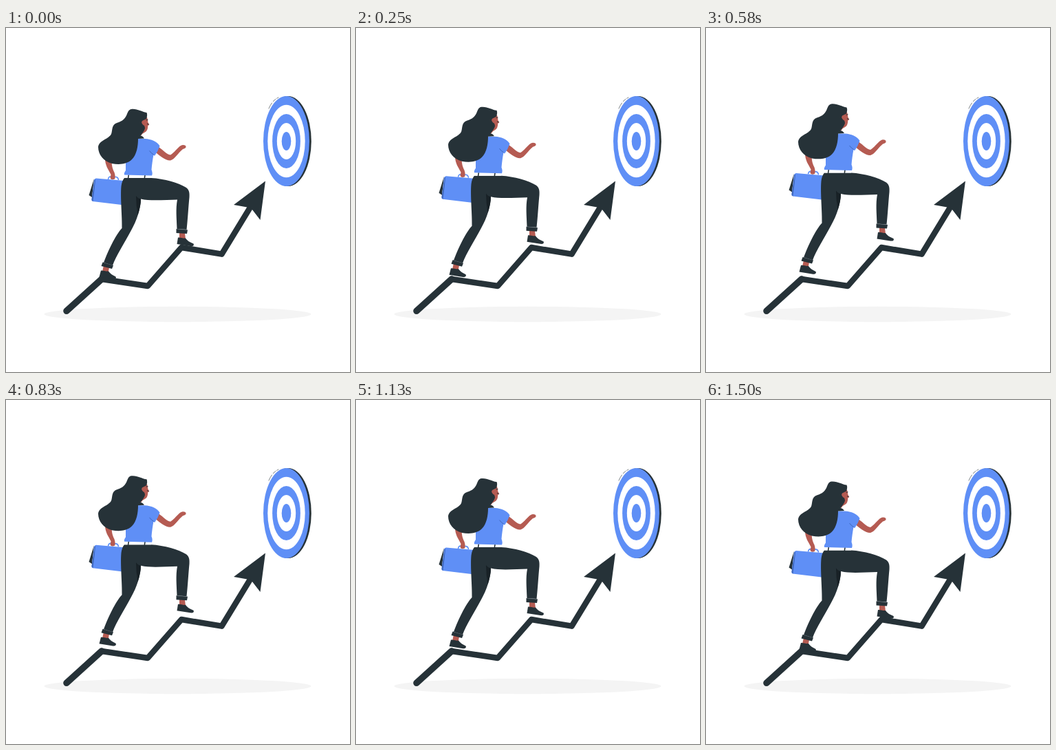
An HTML page for the animation above (1540 ms loop, 500 by 500 pixels).

```html
<!DOCTYPE html>
<html lang="en">
<head>
<meta charset="utf-8">
<title>Climbing to the target</title>
<style>
  html, body { margin: 0; height: 100%; overflow: hidden; background: #fff; }
  svg { display: block; width: 100%; height: 100%; }
  .ink { fill: #263238; }
  .blue { fill: #5f8ff6; }
  .skin { fill: #b55b52; }
  .white { fill: #fff; }
  .line { fill: none; stroke: #263238; stroke-linecap: round; stroke-linejoin: round; }
</style>
</head>
<body>
<svg viewBox="0 0 500 500">
  <ellipse cx="249.5" cy="416" rx="194" ry="11.2" fill="#f4f4f4"/>

  <g id="target">
    <path class="line" stroke-width=".6" stroke-dasharray="9 3 5 2" d="M382 117Q387 105 396 101"/>
    <ellipse class="ink" cx="410" cy="164.5" rx="33.8" ry="65.5"/>
  </g>

  <g id="chart">
    <path class="line" stroke-width="9.6" d="M88 411.3L139 365"/>
    <path class="line" stroke-width="8.4" d="M139 365L206 375L255 319L313.5 328.7L356 259"/>
    <path class="ink" d="M377 222.5L331 257L356 261.500L369.500 279Z"/>
  </g>

  <g id="woman">
    <g id="bag">
      <path class="ink" d="M128 219L120.500 243L125 246Z"/>
      <path class="blue" d="M131 218.500L172 222V257.500L126 252Q124 251 124.500 249L128 221Q129 218.500 131 218.500Z"/>
      <path fill="#3f68bd" d="M129 219.500L124.500 249Q124 251 126.500 252L130 221Z"/>
      <path fill="none" stroke="#5f8ff6" stroke-width="1.700" d="M148.500 220Q149 216 152 216L160 216.500Q163 217 163.500 221"/>
    </g>
    <path class="skin" d="M144 190C144 200 149 206 152.500 213L151.500 218Q153 221.500 158 219.500Q159.500 216 157.500 210C154.500 204 153 198 154 190Z"/>

    <g id="legs">
      <path class="skin" d="M252 297L260 298L261 307H252ZM142 345L150 348L148.500 356L140 354Z"/>
      <path class="ink" d="M250 304.500C253 304 257 306 261 305.500C264 310 268 311.500 272.500 313.500C274 316.500 271 317.500 268 317L248.500 314Z"/>
      <path class="ink" d="M138 352.500C141 352 145 354 149 353.500C152 358 156 359.500 159.500 361.500C161 364.500 158 365.700 154 365L135.500 362Z"/>
      <path class="ink" d="M172 218H211C230 219 251 225 262 232C266 235 267 239 266.500 246C265 262 264 280 262.500 293L248.500 292C248 276 246.500 263 249 249.500C233 249.500 211 252 196 248.500C196 262 190 280 182 294C173 311 160 331 155 345L142 341C148 325 159 301 168.500 291C169 275 166 246 167.500 230Q168.500 222 172 218Z"/>
      <path fill="#182126" d="M189 244Q192 248 196 248.500Q196 258 191.500 272Q189 257 189 244Z"/>
      <path class="ink" d="M247.500 292L264 293.500L263 299L247.500 298ZM140.500 340.500L156 345L154 350L138.500 346Z"/>
      <path class="line" stroke-width=".5" style="stroke:#56636a" d="M248.500 292.300L263 293.500M141.500 340.900L155 344.900"/>
    </g>

    <g id="torso">
      <path class="white" d="M174 213.500L212 214L211 218H172Z"/>
      <path class="line" stroke-width="1.600" d="M178.200 214L177.600 218M202 214L201.400 218"/>
      <path class="skin" d="M222 173C229 178 234 184 239 184.500C245 181 249 174 254 171C257 169 261 170 261.500 172C262 175.500 258 175 256 177C250 182 245 191 239 192.500C232 193 222 185 217 180Z"/>
      <path class="blue" d="M190 161H202C211 161.500 220 165 223.500 171.500Q221 179 216 186L214.500 184C213 192 212 199 211.500 206Q213.500 211 212 214.500L172 213.500Q171 211 174 207V185Z"/>
      <path fill="none" stroke="#3f68bd" stroke-width="1" d="M208.500 178.500Q211 182 215 184.500"/>
    </g>

    <g id="head">
      <path class="skin" d="M196 131L205 130Q206.500 134 206.300 137L208.200 140.500L206.300 142Q206 150 202 151.500Q198 153 196 157Z"/>
      <path class="ink" d="M182 118C191 117 197 122 204.500 123Q206 127 204 132Q200 134 198 135Q196 138 199 140Q202 142 202 146C201 150 198 153 195.500 156.500Q199 157 201 160.500L192 161C192 172 190 184 183 191C176 198 165 199 154 197C142 194 134 184 134 173C135 163 149 162 153 154C155 149 153 141 161 138C167 136 171 134 174 129C177 124 177 119 182 118Z"/>
      <path class="skin" d="M198 135.500Q202 133 203.500 136Q203 140 200 141.500Q197 139 198 135.500Z"/>
      <path class="line" stroke-width="1" d="M204 133.700L206 133.300M205.300 139.500L207.300 140"/>
    </g>
  </g>
</svg>
<script>
  const LOOP = 1540, STEP = 1000 / 24, STEPS = 37, LIFT = 10;
  const woman = document.getElementById("woman");
  const target = document.getElementById("target");

  [[33.5, 65.5], [27.2, 52.700], [20.4, 39.600], [13.7, 26.500], [6.8, 13.400]].forEach(([rx, ry], i) => {
    const ring = document.createElementNS("http://www.w3.org/2000/svg", "ellipse");
    const attrs = { cx: 407.5, cy: 164.5, rx, ry, class: i % 2 ? "white" : "blue" };
    for (const name in attrs) ring.setAttribute(name, attrs[name]);
    target.append(ring);
  });

  // Constant-speed rise and fall, held at 24 steps per second
  function draw(now) {
    const step = Math.floor((now % LOOP + 4.9) / STEP) % STEPS;
    const phase = (step / STEPS + 0.0375) % 1;
    const rise = LIFT * (1 - Math.abs(2 * phase - 1));
    woman.setAttribute("transform", `translate(0 ${0.75 - rise})`);
  }

  const start = performance.now();
  function tick() {
    draw(performance.now() - start);
    requestAnimationFrame(tick);
  }
  tick();
</script>
</body>
</html>
```
